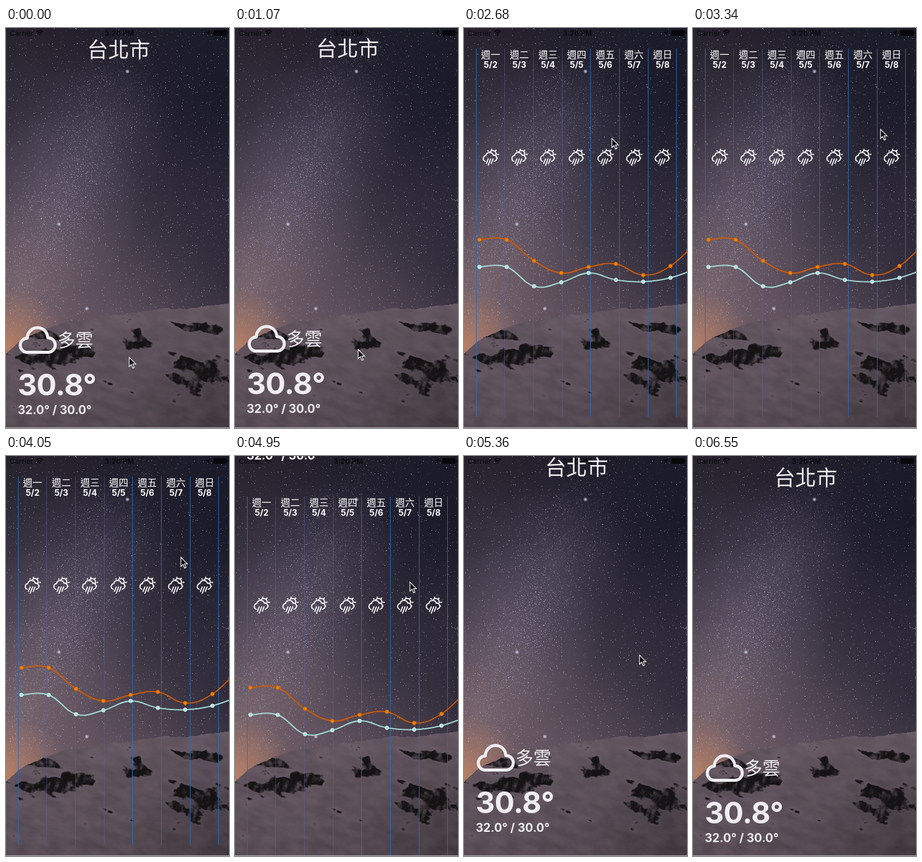
Write an HTML page with a canvas that moves like this. It is 371 px wide and 663 px high and loops after 7.11 s.

```html
<!DOCTYPE html>
<html lang="zh-Hant">
<head>
<meta charset="utf-8">
<style>
  html, body { margin: 0; width: 100%; height: 100%; overflow: hidden; background: #2a2633; }
  canvas, svg { position: absolute; left: 0; top: 0; }
  text { font-family: Inter, "Noto Sans CJK TC", "Noto Sans CJK JP", "Noto Sans CJK", sans-serif; }
</style>
</head>
<body>
<canvas id="sky" width="371" height="663"></canvas>
<svg width="371" height="663" viewBox="0 0 371 663">
  <g fill="#08080c">
    <text x="6" y="12.5" font-size="12">Carrier</text>
    <path d="M50.5 6.5q5.5-5 11 0M52.7 9q3.3-3 6.6 0" fill="none" stroke="#08080c" stroke-width="1.7"/>
    <circle cx="56" cy="11" r="1.5"/>
    <text x="188.5" y="12.5" font-size="12" font-weight="600" text-anchor="middle">3:26 PM</text>
    <path d="M340 4l-3.5 8.5-.8-4-4-.8z"/>
    <rect x="345" y="3.5" width="22" height="9.5" rx="2"/>
    <rect x="368" y="6.5" width="1.5" height="3.5"/>
  </g>
  <g id="content">
    <g fill="#f0eef2">
      <text x="187.5" y="49" font-size="35" text-anchor="middle">台北市</text>
      <path d="M34 537.5a11.8 11.8 0 0 1 1.5-23.5a17 17 0 0 1 34-.5a12 12 0 0 1 1 24z"
            fill="none" stroke="#f0eef2" stroke-width="5" stroke-linejoin="round"/>
      <text x="86" y="528" font-size="29.5">多雲</text>
      <text x="19.5" y="609" font-size="49.5" font-weight="700" letter-spacing="-.6">30.8°</text>
      <text x="19.5" y="640" font-size="19.5" font-weight="700">32.0° / 30.0°</text>
    </g>
    <g id="forecast" transform="translate(0 667)"></g>
  </g>
  <path id="cursor" d="M0 0V15l3.5-3.3 2.6 5.9 2.4-1-2.5-5.7h4.8z" fill="#0a0a0c" stroke="#f4f4f4" stroke-width="1.2"/>
  <rect y="662" width="371" height="1" fill="#b9b4ba"/>
</svg>
<script>
const W = 371, H = 663, LOOP = 7110, PAGE = 667;
const $ = id => document.getElementById(id);
const clamp = v => Math.max(0, Math.min(1, v));
const mix = (a, b, k) => a + (b - a) * k;

let seed = 11;
const rnd = () => (seed = (seed * 16807) % 2147483647) / 2147483647;
const gauss = () => rnd() + rnd() + rnd() - 1.5;

const hash = (x, y) => {
  const s = Math.sin(x * 127.1 + y * 311.7) * 43758.5;
  return s - Math.floor(s);
};
function noise(x, y) {
  const ix = Math.floor(x), iy = Math.floor(y);
  const [u, v] = [x - ix, y - iy].map(k => k * k * (3 - 2 * k));
  return mix(mix(hash(ix, iy), hash(ix + 1, iy), u), mix(hash(ix, iy + 1), hash(ix + 1, iy + 1), u), v);
}
const fractal = (x, y) =>
  (8 * noise(x, y) + 4 * noise(2 * x, 2 * y) + 2 * noise(4 * x, 4 * y) + noise(8 * x, 8 * y)) / 15;

function paintSky(c) {
  const base = c.createLinearGradient(0, 0, 0, 500);
  ['#25222d', '#393341', '#4a414e', '#62535f'].forEach((color, i) => base.addColorStop(i / 3, color));
  c.fillStyle = base;
  c.fillRect(0, 0, W, H);

  const glow = (x, y, r, rgb, alpha) => {
    const g = c.createRadialGradient(x, y, 0, x, y, r);
    [1, .5, 0].forEach((k, i) => g.addColorStop(i / 2, `rgba(${rgb},${alpha * k})`));
    c.fillStyle = g;
    c.fillRect(0, 0, W, H);
  };
  glow(W, 110, 330, '20,21,36', .85);
  glow(400, 410, 230, '32,30,46', .75);
  glow(150, 170, 130, '110,102,130', .3);
  glow(80, 290, 150, '130,116,138', .4);
  glow(20, 420, 150, '155,128,132', .45);
  glow(0, 528, 100, '225,150,105', .65);

  const star = (x, y, alpha) => {
    c.fillStyle = `rgba(214,207,232,${alpha})`;
    c.fillRect(Math.floor(x), Math.floor(y), 1, 1);
  };
  for (let i = 0; i < 5000; i++) star(rnd() * W, rnd() * 490, .06 + .8 * rnd() ** 3);
  // The milky way: stars scattered about a diagonal, thinned out by dust clouds.
  for (let i = 0; i < 9000; i++) {
    const k = rnd(), x = 215 - 205 * k + gauss() * 75, y = 40 + 430 * k + gauss() * 50;
    const dust = clamp((fractal((x + y) / 60, (y - x) / 130) - .3) * 2.5);
    star(x, y, (.05 + .5 * rnd() ** 2) * dust);
  }
  for (const [x, y] of [[134.5, 465], [88, 325], [202, 72]]) {
    glow(x, y, 4, '215,220,255', .9);
    star(x, y, 1);
  }
}

function paintMountain(c) {
  const rocks = [[55, 548, 65, 16], [65, 508, 45, 10], [120, 535, 28, 14],
    [213, 520, 37, 20], [315, 576, 58, 36], [330, 498, 45, 10]];
  const ridge = x => 489 - .088 * x + 49 * Math.exp(-x / 55) + 7 * (fractal(x / 22, 3) - .5);
  const image = c.getImageData(0, 0, W, H);
  for (let x = 0; x < W; x++) {
    for (let y = Math.ceil(ridge(x)); y < H; y++) {
      const near = Math.max(...rocks.map(([cx, cy, rx, ry]) =>
        Math.exp(-(((x - cx) / rx) ** 2) - ((y - cy) / ry) ** 2)));
      const rough = fractal((x + .6 * y) / 26, (y - .4 * x) / 13);
      const grain = fractal((x + .5 * y) / 7, (y - .7 * x) / 12);
      const rock = clamp((near * .55 + rough - .8) * 12);
      const depth = (y - 460) / 200;
      const snow = 102 - 12 * depth - 26 * depth * (x / W) ** 2 + 26 * (rough - .5);
      const value = mix(snow, 22 + 150 * Math.max(0, grain - .48), rock);
      image.data.set([value, value * .87, value * .97], 4 * (y * W + x));
    }
  }
  c.putImageData(image, 0, 0);
}

function buildForecast() {
  const columns = Array.from({ length: 8 }, (_, i) => {
    const faint = i > 0 && i < 4;
    return `<path d="M${Math.floor(20 + i * 47.7) + .5} 34V645" stroke="${faint ? '#5c6497' : '#2b6cb4'}" opacity="${faint ? .5 : .95}"/>`;
  });
  const days = [...'一二三四五六日'].map((day, i) => `
    <g transform="translate(${44.3 + i * 47.7} 0)" fill="#fff" text-anchor="middle">
      <text y="49.5" font-size="16" font-weight="500">週${day}</text>
      <text y="66" font-size="14" font-weight="700">5/${i + 2}</text>
      <path transform="translate(-14 200)" fill="none" stroke="#fff" stroke-width="1.8" stroke-linecap="round"
        d="M5 21a5 5 0 0 1 1-9.6a6.5 6.5 0 0 1 12.5-.6a5 5 0 0 1 1.5 10M12.5 6a5.5 5.5 0 0 1 10 5.5
           M15.5 .8v1.4M22 3.5l1-1M25.5 9.5h1.7M9.5 3.5l.8.8M24.5 15l.8.6M10 17l-3 7.5M14 17l-4 10.5M18 17l-3 7.5"/>
    </g>`);
  const curve = (ys, line, dot, rim) => {
    const p = ys.map((y, i) => [25.7 + i * 45.4, y]);
    const at = i => p[Math.max(0, Math.min(p.length - 1, i))];
    const lean = (i, sign) => [0, 1].map(k => at(i)[k] + sign * .2 * (at(i + 1)[k] - at(i - 1)[k]));
    const d = p.slice(1).map((q, i) => `C${lean(i, 1)} ${lean(i + 1, -1)} ${q}`).join('');
    return `<path d="M${p[0]}${d}" fill="none" stroke="${line}" stroke-width="2"/>` +
      p.map(([x, y]) => `<circle cx="${x}" cy="${y}" r="3" fill="${dot}" stroke="${rim}"/>`).join('');
  };
  $('forecast').innerHTML = columns.join('') + days.join('') +
    curve([351, 351, 386, 406, 396, 391, 409.5, 394.5, 352], '#cc5a05', '#f08205', '#d86a00') +
    curve([396, 396, 428, 421.5, 406, 417.5, 420.5, 414, 398], '#a3dcd8', '#a9e2de', '#e2f6f4');
}

// The screen is refreshed in steps of STEP ms; each move gives start, end, target and easing power.
const STEP = 55;
const CURSOR_START = { x: 205, y: 546 };
const cursorMoves = [
  { from: 210, to: 410, x: 205, y: 533 },
  { from: 1120, to: 1230, x: 256, y: 321 },
  { from: 1950, to: 2290, x: 246, y: 183 },
  { from: 2740, to: 3400, x: 324, y: 165 },
  { from: 3600, to: 4050, x: 291, y: 168 },
  { from: 4890, to: 5120, x: 292, y: 330, power: 1.5 },
  { from: 6010, to: 6140, x: 321, y: 597 },
  { from: 6350, to: 6550, x: 331, y: 666 }
];

function cursorAt(t) {
  let { x, y } = CURSOR_START;
  for (const move of cursorMoves) {
    if (t < move.from) break;
    const steps = Math.round((move.to - move.from) / STEP) + 1;
    const done = t >= move.to ? steps : Math.floor((t - move.from) / STEP) + 1;
    const k = (done / steps) ** (move.power || 1);
    x = mix(x, move.x, k);
    y = mix(y, move.y, k);
  }
  return { x: Math.round(x), y: Math.round(y) };
}

function scrollAt(t, cursor) {
  const snapped = 1620, grabbed = 4890, released = 5120, dragged = 131;
  if (t < snapped) return Math.max(0, CURSOR_START.y - cursor.y - 11);
  if (t < grabbed) return PAGE;
  if (t <= released) return PAGE - dragged * (cursor.y - 168) / 162;
  // Critically damped return to the first page.
  const s = .022 * 60 * Math.floor((t - released) / 60);
  return (PAGE - dragged) * (1 + s) * Math.exp(-s);
}

function draw(now) {
  const t = now % LOOP, cursor = cursorAt(t);
  $('content').setAttribute('transform', `translate(0 ${-Math.round(scrollAt(t, cursor))})`);
  $('cursor').setAttribute('transform', `translate(${cursor.x} ${cursor.y})`);
}

const context = $('sky').getContext('2d');
paintSky(context);
paintMountain(context);
buildForecast();
const begin = performance.now();
function tick() {
  draw(performance.now() - begin);
  requestAnimationFrame(tick);
}
tick();
</script>
</body>
</html>
```
